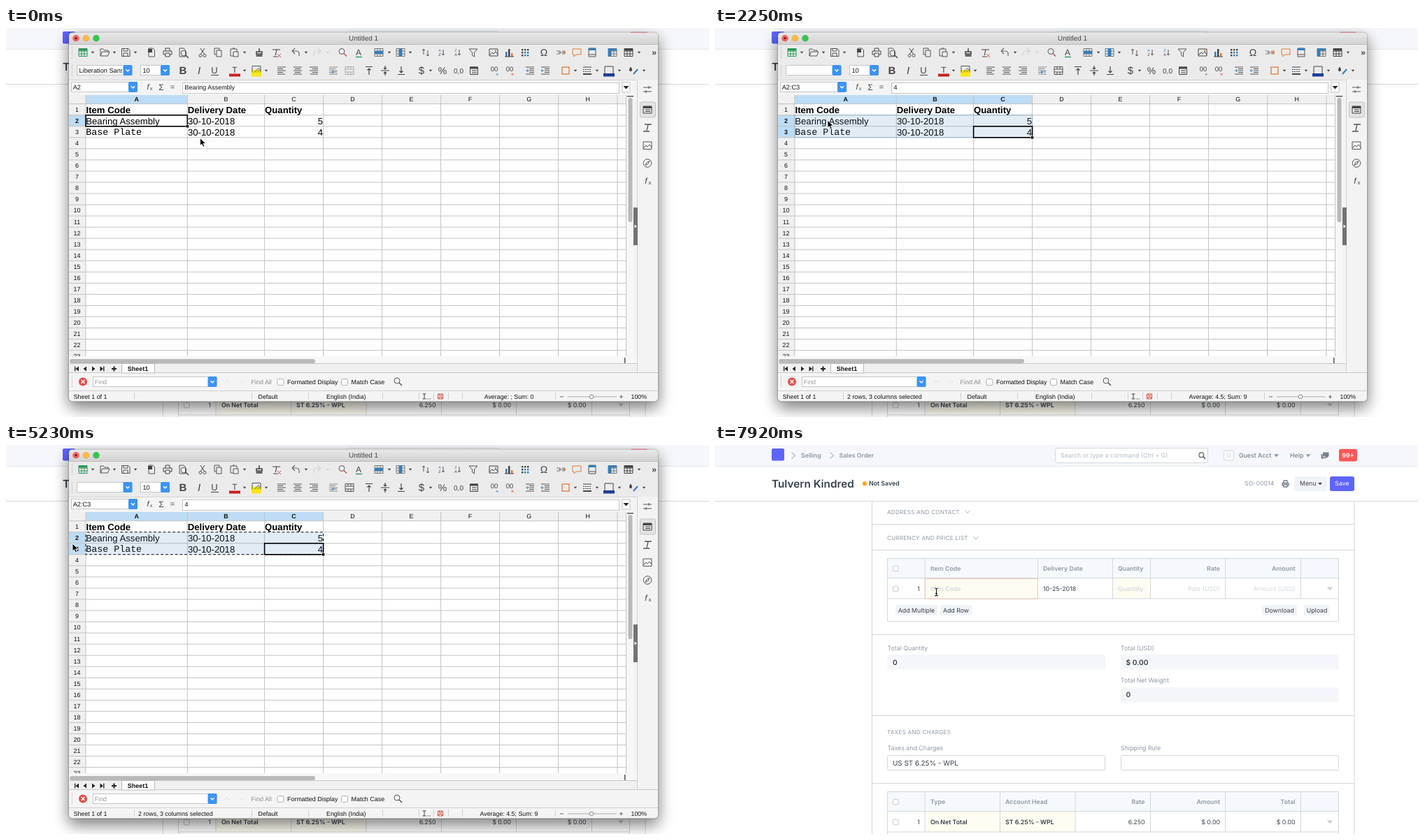
Animation, 1005 px wide and 557 px high, one loop 8 s. Source, as an HTML page:

```html
<!DOCTYPE html>
<html lang="en">
<head>
<meta charset="utf-8">
<title>Copy rows into an order</title>
<style>
html, body { margin: 0; width: 100%; height: 100%; overflow: hidden; background: #fff; }
svg { display: block; width: 1005px; height: 557px; text-rendering: geometricPrecision; }
text { white-space: pre; }
.shadow { filter: drop-shadow(0 9px 11px rgba(0, 0, 0, .38)) drop-shadow(0 0 1px rgba(0, 0, 0, .5)); }
</style>
</head>
<body>
<svg id="stage" viewBox="0 0 1005 557" xmlns="http://www.w3.org/2000/svg"></svg>
<script>
const LOOP = 8000;
const MID = { 'text-anchor': 'middle' }, END = { 'text-anchor': 'end' };
const SEMI = { 'font-weight': 600 }, BOLD = { 'font-weight': 700 };

const el = (tag, attrs, body = '') =>
  `<${tag} ${Object.entries(attrs).map(([k, v]) => `${k}="${v}"`).join(' ')}>${body}</${tag}>`;
const group = (attrs, parts) => el('g', attrs, parts.flat(9).join(''));
const rect = (x, y, width, height, fill, o = {}) => el('rect', { x, y, width, height, fill, ...o });
const dot = (cx, cy, r, fill, o = {}) => el('circle', { cx, cy, r, fill, ...o });
const line = (d, stroke, o = {}) => el('path', { d, stroke, fill: 'none', ...o });
const text = (x, y, s, o = {}) => el('text', { x, y, ...o }, s);
const icon = (x, y, d, stroke = '#555', o = {}) => line(d, stroke, { transform: `translate(${x} ${y})`, ...o });
const caret = (x, y, w, fill) => el('path', { d: `M${x - w} ${y - w / 2}h${2 * w}l${-w} ${w * 1.1}z`, fill });

/* ---------- order form ---------- */
const GREY = '#8d99a6', EDGE = '#d1d8dd', INK = '#36414c', PALE = { fill: '#d1d8dd' };
const box = (x, y, w, h, fill = '#fff', stroke = EDGE, rx = 0) => rect(x, y, w, h, fill, { stroke, rx });
const label = (x, y, s) => text(x, y, s, { fill: GREY });
const section = (y, s, chevron) => [
  text(246, y, s, { fill: GREY, 'font-size': 8.1, 'letter-spacing': .27 }),
  chevron ? icon(chevron, y - 2.7, 'M-3.5-2L0 2L3.5-2', '#aab4be') : ''];
const button = (x, y, w, s) => [rect(x, y, w, 15, '#f0f4f7', { rx: 2 }), text(x + w / 2, y + 10.7, s, MID)];
const total = (x, w, y, name, value) => [
  label(x, y, name), rect(x, y + 6.6, w, 21.4, '#f4f6f9', { rx: 2 }),
  text(x + 7.5, y + 21, value, { ...SEMI, 'font-size': 10.2 })];

function table(y, cuts, tinted, heads, footer) {
  const top = y + .5, mid = y + 29, low = y + 58.5, end = low + footer;
  return [
    rect(246, y, 646, 29, '#f6f9fc'),
    tinted.map(([a, b]) => rect(a, mid, b - a, 29, '#fffcf1')),
    line(`M246.5 ${top}H891.5V${end}H246.5ZM246.5 ${mid - .5}H891.5M246.5 ${low - .5}H891.5`, EDGE),
    line(cuts.map(x => `M${x} ${top}V${low}`).join(''), EDGE),
    [15.2, 44.3].map(d => box(254.5, y + d - 4, 7.5, 7.5, '#fff', '#c3c9cf', 1)),
    heads.map(([x, s, o]) => text(x, y + 17.6, s, { fill: GREY, ...SEMI, ...o })),
    text(291, y + 46.6, '1', MID), caret(879, y + 43.5, 4.2, '#c5ccd3')];
}

const page = group({ 'font-family': 'Inter, sans-serif', 'font-size': 8.8, fill: INK }, [
  rect(0, 0, 1005, 557, '#fff'),
  rect(0, 0, 1005, 30, '#f5f7fa'), line('M0 30.5H1005', '#e4e9ed'),
  rect(81, 5, 18, 17.5, '#5e64ff', { rx: 2 }),
  [112, 167].map(x => icon(x, 15, 'M-2.5-4.5L2.5 0L-2.5 4.5', '#b4bec8', { 'stroke-width': 1.2 })),
  text(123, 18.2, 'Selling', { fill: GREY, ...SEMI }),
  text(177.5, 18.2, 'Sales Order', { fill: GREY, ...SEMI }),
  box(486.5, 4.5, 218, 21, '#fff', EDGE, 3),
  text(494, 18.2, 'Search or type a command (Ctrl + G)', { fill: '#b3bcc5' }),
  icon(696, 15, 'M2.4 1.6L5 5', '#55606b', { 'stroke-width': 1.6 }),
  dot(695.3, 14.2, 3.4, 'none', { stroke: '#55606b', 'stroke-width': 1.2 }),
  box(727.5, 8, 14, 14, '#f9fafb', EDGE, 2), text(734.5, 18.2, 'G', { ...PALE, ...MID }),
  text(749, 17.8, 'Guest Acct', { fill: '#76828e', 'font-weight': 500 }), caret(802.5, 15, 3.6, GREY),
  text(822, 17.8, 'Help', { fill: '#76828e', 'font-weight': 500 }), caret(848, 15, 3.6, GREY),
  el('path', { d: 'M869 10.5h8.5v6h-1.5v1.5h-1.5l-2-1.5h-3.5z', fill: '#76828e' }),
  el('path', { d: 'M866.5 13h2v4.5h5.5v1.5h-4.5l-2 2v-2h-1z', fill: '#76828e' }),
  rect(892, 5.7, 26, 17.8, '#ff5858', { rx: 3 }), text(905, 18, '99+', { ...MID, ...SEMI, fill: '#fff' }),
  line('M0 80.5H1005', EDGE),
  text(81, 61, 'Tulvern Kindred', { ...SEMI, 'font-size': 15.3 }),
  dot(214, 55.3, 3, '#ffa00a'), text(220, 58.4, 'Not Saved', SEMI),
  text(757, 58.4, 'SO-00014', { fill: GREY }),
  icon(815.5, 55.5, 'M-2.5-1.5V-4.5H2.5V-1.5M-4.5 2.5V-1H4.5V2.5H2.5M-4.5 2.5H-2.5M-2.5 1H2.5V4.5H-2.5Z', '#76828e', { 'stroke-width': 1.3 }),
  rect(828, 45, 47, 21, '#f0f4f7', { rx: 3 }), text(836, 58.4, 'Menu'), caret(865, 55.5, 3, INK),
  rect(879, 45, 35, 21, '#5e64ff', { rx: 3 }), text(896.5, 58.4, 'Save', { ...MID, fill: '#fff' }),
  line('M224.5 81V557M914 81V557' + [113.5, 150.5, 271.5, 387.5, 484.5].map(y => `M224.5 ${y}H914`).join(''), EDGE),
  section(98.5, 'ADDRESS AND CONTACT', 361), section(135.8, 'CURRENCY AND PRICE LIST', 373),
  table(162, [300, 461.5, 568.5, 622.5, 729.5, 837.5], [[300, 461], [569, 622]], [
    [308, 'Item Code'], [469, 'Delivery Date'], [576, 'Quantity'], [722, 'Rate', END], [829.5, 'Amount', END]], 32),
  text(308, 208.7, 'Item Code', { ...PALE, ...SEMI }), text(469, 208.7, '10-25-2018'),
  text(576, 208.7, 'Quantity', { ...PALE, ...SEMI }),
  text(722, 208.7, 'Rate (USD)', { ...PALE, ...END }), text(829.5, 208.7, 'Amount (USD)', { ...PALE, ...END }),
  button(258, 229, 60, 'Add Multiple'), button(322, 229, 45, 'Add Row'),
  button(782, 229, 50, 'Download'), button(842, 229, 37, 'Upload'),
  total(246.5, 311.5, 293.5, 'Total Quantity', '0'), total(580, 311.5, 293.5, 'Total (USD)', '$ 0.00'),
  total(580, 311.5, 340.3, 'Total Net Weight', '0'),
  section(414, 'TAXES AND CHARGES'),
  label(246.5, 437.3, 'Taxes and Charges'), label(580, 437.3, 'Shipping Rule'),
  box(246.5, 444.5, 311, 21, '#fff', EDGE, 2), box(580.5, 444.5, 311, 21, '#fff', EDGE, 2),
  text(254, 459, 'US ST 6.25% - WPL', { 'font-size': 9.9 }),
  table(496, [300, 407.5, 515, 622.5, 729.5, 837.5], [[300, 515]], [
    [308, 'Type'], [415, 'Account Head'], [614.5, 'Rate', END], [722, 'Amount', END], [829.5, 'Total', END]], 8),
  text(308, 542.6, 'On Net Total', SEMI), text(415, 542.6, 'ST 6.25% - WPL', SEMI),
  text(614.5, 542.6, '6.250', END), text(722, 542.6, '$ 0.00', END), text(829.5, 542.6, '$ 0.00', END),
  rect(300.5, 191.5, 161, 29, 'none', { id: 'focus', stroke: '#f3c9bd' }),
  line('M308.5 200V211', '#222', { id: 'textCaret' }),
]);

/* ---------- spreadsheet ---------- */
const edges = [114, 259.3, 369.6, 453.6, 537.6, 621.6, 705.6, 789.7, 874];
const rowTop = n => 108.7 + (n - 1) * 16.04;
const HEAD = '#f0f0f0', PICKED = '#bddcf5';
const DARK = '#444', RED = '#d9483b', BLUE = '#2f7fc1', GREEN = '#2c9a5b', ORANGE = '#e07b39', NAVY = '#1c3f94';

const combo = (x, y, w, h = 15) => [
  rect(x + .5, y + .5, w - 1, h - 1, '#fff', { stroke: '#c6c6c6' }),
  rect(x + w - 13, y, 13, h, '#3d93f3', { rx: 2 }),
  icon(x + w - 6.5, y + h / 2, 'M-2.5-1.2L0 1.5L2.5-1.2', '#fff', { 'stroke-width': 1.3 })];
const grip = (y, h) => line(`M94.5 ${y}v${h}`, '#aaa', { 'stroke-dasharray': '1 1.5' });
const glyph = (x, y, s, size, o = {}) => text(x, y, s, { ...MID, 'font-size': size, fill: DARK, ...o });
const bars = (x, y, widths, align, stroke = '#555') => icon(x, y, widths.map((w, i) =>
  `M${align < 0 ? -6 : align > 0 ? 6 - w : -w / 2} ${i * 2.5 - 5}h${w}`).join(''), stroke);
const sheetIcon = (x, y, c) => icon(x, y, 'M-6-5.5H6V5.5H-6ZM-6-2H6M-6 2H6M-2-5.5V5.5M2-5.5V5.5', c);
const lens = (x, y, c) => [dot(x - 1, y - 1, 4, 'none', { stroke: '#555' }), icon(x, y, 'M2 2L6 6', c, { 'stroke-width': 1.5 })];
const PAGE = 'M-4-6H2L4.5-3.5V6H-4Z';

const mainBar = [
  grip(27, 16), sheetIcon(110, 35, GREEN), rect(104, 29.5, 12, 3, GREEN),
  icon(141, 35, 'M-6 5V-5H-2L0-3H5V-1M-6 5L-3.5-1H7L4.5 5Z'),
  icon(171, 35, 'M-5.5-5.5H4L6-3.5V5.5H-5.5ZM-3-5.5V-2H3V-5.5M-3 5.5V1H3V5.5'),
  icon(208, 35, PAGE), rect(203, 30, 6, 5, DARK),
  icon(231, 35, 'M-3-2V-6H3V-2M-3 3H-6V-2H6V3H3M-3 1H3V6H-3Z', DARK),
  icon(252, 35, PAGE), lens(255, 37, DARK),
  icon(281, 35, 'M-3-6L3 3M3-6L-3 3', DARK),
  [278, 284].map(x => dot(x, 39.5, 2, 'none', { stroke: '#555' })),
  icon(303, 35, 'M-5-6H2V-3M-5-6V3H-2M-2-3H5V6H-2Z'),
  icon(326, 35, 'M-5-5H4V-1M-5-5V5H-1M-1-1H6V6H-1ZM-2-6H1'),
  icon(362, 35, 'M0-6V-1M-4-1H4V2H-4Z', DARK, { 'stroke-width': 1.5 }), rect(357.5, 37, 9, 4, '#666'),
  glyph(386, 39, 'I', 12, { 'font-style': 'italic' }), icon(387, 36, 'M-6-5H5M-5 5H1', DARK), icon(387, 36, 'M1 1L6 6M6 1L1 6', RED),
  icon(414, 35, 'M-5-2H1Q6-2 5 5M-5-2L-1-6M-5-2L-1 2', '#666', { 'stroke-width': 1.2 }),
  icon(445, 35, 'M5-2H-1Q-6-2-5 5M5-2L1-6M5-2L1 2', '#d2d2d2', { 'stroke-width': 1.2 }),
  lens(481, 34.5, RED), glyph(504, 39, 'A', 12), line('M500 41.5H509', GREEN, { 'stroke-width': 1.4 }),
  sheetIcon(533, 35, '#777'), rect(527, 33, 12, 4, BLUE),
  sheetIcon(564, 35, '#777'), rect(562, 29.5, 4, 11, BLUE),
  icon(600, 35, 'M-3 3V-5M-5-3L-3-5L-1-3M3-3V5M1 3L3 5L5 3'),
  [[622, 'A', 'Z'], [645, 'Z', 'A']].map(([x, a, z]) => [
    glyph(x - 2, 34, a, 5.5, { fill: BLUE }), glyph(x - 2, 40, z, 5.5), icon(x + 3, 35, 'M0-4V4M-2 2L0 4L2 2')]),
  icon(668, 35, 'M-6-5H6L1.5 0V6L-1.5 4V0Z'),
  icon(697, 35, 'M-6-5H6V5H-6ZM-6 4L-2 0L0 2L3-1L6 3', DARK), rect(699, 31.5, 2, 2, ORANGE),
  rect(714, 34, 2.5, 7, BLUE), rect(718, 30, 2.5, 11, DARK), rect(722, 36, 2.5, 5, ORANGE), line('M713 41H726', DARK),
  [-4, 0, 4].map(a => [-4, 0, 4].map(b => rect(741 + a, 34 + b, 2.4, 2.4, b < 0 || a < 0 ? DARK : BLUE))),
  glyph(769, 40, 'Ω', 14), icon(793, 35, 'M-6-2H-1V2H-6M6-2H2M6 2H2M-3 0H4', '#777'), rect(797, 33.5, 3, 3, ORANGE),
  icon(816, 35, 'M-6-5H6V3H-1L-4 6V3H-6Z', ORANGE),
  icon(838, 35, 'M-5-6H5V6H-5ZM-5 3H5'), rect(833, 29, 10, 3, BLUE),
  sheetIcon(867, 35, '#777'), rect(861, 29.5, 4, 11, BLUE), rect(861, 29.5, 12, 3, BLUE),
  sheetIcon(890, 35, DARK), rect(884, 29.5, 12, 3, DARK),
  [124, 155, 185, 341, 429, 548, 578, 905].map(x => caret(x, 35, 2.3, DARK)), caret(460, 35, 2.3, '#d2d2d2'),
  glyph(926.5, 38.5, '»', 12, BOLD),
];

const vAlign = (x, d) => icon(x, 61, d, DARK, { 'stroke-width': 1.2 });
const formatBar = [
  grip(53, 16), combo(101, 53, 79.5), combo(192, 53, 42),
  el('clipPath', { id: 'fontClip' }, rect(102, 53, 64, 15, '#000')),
  text(104.5, 63.8, 'Liberation Sans', { id: 'fontName', 'clip-path': 'url(#fontClip)', 'font-size': 9.2 }),
  text(195.5, 63.8, '10', { 'font-size': 9.2 }),
  glyph(253, 66, 'B', 15, BOLD), glyph(276, 66, 'I', 15, { 'font-style': 'italic' }),
  glyph(298, 65, 'U', 13), line('M293 67.5H304', DARK),
  glyph(327, 64, 'T', 12), rect(319, 65.5, 16, 4, '#c9211e'),
  rect(351, 60, 14, 9.5, '#f9e814'), icon(358, 59.5, 'M-6 4V-5H6V4M-3 4L3-2L5 0L1 4'),
  bars(394, 61, [12, 8, 12, 8, 11], -1), bars(417, 61, [12, 8, 12, 8, 12], 0), bars(440, 61, [12, 8, 12, 8, 11], 1),
  bars(468, 61, [12, 9, 12, 6, 12], -1, '#888'), icon(470, 62, 'M-4 1H3M-2-1L-4 1L-2 3', BLUE),
  icon(491, 61, 'M-6-5.5H6V5.5H-6ZM-6-2H6M-6 2H6M-2-5.5V-2M2-5.5V-2M-2 2V5.5M2 2V5.5', '#555', { id: 'merge' }),
  vAlign(519, 'M-5-5.5H5M0 6V-3M-2.5-.5L0-3L2.5-.5'),
  vAlign(542, 'M-6 0H6M0-7V-2M-2-4L0-2L2-4M0 7V2M-2 4L0 2L2 4'),
  vAlign(565, 'M-5 5.5H5M0-6V3M-2.5 .5L0 3L2.5 .5'),
  glyph(594, 66, '$', 15), glyph(624, 65.5, '%', 14), glyph(647, 64.5, '0,0', 10),
  icon(669, 61, 'M-5.5-5H5.5V5.5H-5.5ZM-3 0H4M-3 3H4', DARK), rect(663.5, 55.5, 11, 3, DARK),
  [[698, BLUE, '+'], [720, RED, '×']].map(([x, c, s]) => [glyph(x, 62, '00', 9.5), glyph(x + 4, 69, s, 8, { fill: c })]),
  bars(749, 61, [12, 7, 7, 7, 12], 1), icon(745, 61, 'M-2 0H2M0-2L2 0L0 2', BLUE),
  bars(771, 61, [12, 7, 7, 7, 12], 1), icon(767, 61, 'M-2 0H2M0-2L-2 0L0 2', BLUE),
  rect(795, 56, 10, 10, 'none', { stroke: ORANGE, 'stroke-width': 1.3 }),
  icon(831, 61, 'M-6-5H6', DARK), icon(831, 61, 'M-6-1.5H6M-6 1.5H6', DARK, { 'stroke-dasharray': '2 1' }),
  icon(831, 61, 'M-6 5H6', DARK, { 'stroke-width': 2 }),
  icon(862, 60, 'M-6 5V-5H6V5', DARK), rect(854, 65, 16, 4.5, NAVY),
  icon(896, 60, 'M-3-4Q-6 1-3 2Q0 1-3-4Z', DARK, { fill: DARK }), icon(900, 63, 'M-3 3L3-4', BLUE, { 'stroke-width': 2 }),
  [341, 372, 607, 814, 845, 877, 912].map(x => caret(x, 61, 2.3, DARK)),
];

const formulaBar = [
  combo(93, 77, 95), text(95.7, 88, '', { id: 'cellName', 'font-size': 9.2 }),
  glyph(203, 88, 'f', 11, { 'font-style': 'italic' }), glyph(207.5, 89, 'x', 7),
  glyph(222, 88.5, 'Σ', 12), glyph(238, 88, '=', 11),
  rect(252.5, 78.5, 624, 15, '#fff', { stroke: '#c6c6c6' }), text(255.5, 88, '', { id: 'formula' }),
  rect(881, 78, 11, 14, '#fff', { stroke: '#c6c6c6' }), caret(886.5, 85, 4, '#222'),
];

const sideBar = [
  rect(902, 74, 30, 419, '#f3f3f3'), line('M902.5 74V493', '#cfcfcf'),
  icon(917, 88, 'M-6-3H6M-6 3H6M2-5V-1M-2 1V5'),
  rect(906.5, 106, 22, 22, '#e3e3e3', { stroke: '#c4c4c4', rx: 2 }),
  icon(917, 117, 'M-6-5H6V5H-6ZM-3 0H4M-3 2.5H4', DARK), rect(911, 112, 12, 3, DARK),
  icon(917, 143, 'M-4-5H6M1-5L-1 4M-6 5H3', '#555', { 'stroke-width': 1.3 }),
  icon(917, 168, 'M-6-5H6V5.5H-6ZM-6 4L-2 0L0 2L3-1L6 3'),
  dot(917, 193.5, 5.8, 'none', { stroke: '#555' }), icon(917, 193.5, 'M3-3L1 1L-3 3L-1-1Z'),
  glyph(915, 223, 'f', 12, { 'font-style': 'italic' }), glyph(920.5, 224, 'x', 8),
  rect(897, 257, 6, 54, '#737373'), el('path', { d: 'M898.5 281.5l3.5 2.5l-3.5 2.5z', fill: '#fff' }),
];

const CELL = { 'font-size': 13.15, fill: '#000' };
const range = (n, f) => Array.from({ length: n }, (_, i) => f(i));
const ants = (stroke, o) => rect(114, rowTop(2), 339.6, 32.08, 'none', { stroke, ...o });
const grid = [
  rect(90, 96, 797, 374, '#fff'), rect(90, 96, 797, 12.7, HEAD), rect(90, 96, 24, 374, HEAD),
  range(8, i => rect(edges[i], 96, edges[i + 1] - edges[i], 12.7, HEAD, { class: 'colHead' })),
  el('clipPath', { id: 'gridClip' }, rect(90, 96, 797, 374, '#000')),
  group({ 'clip-path': 'url(#gridClip)' }, [
    range(23, i => rect(90, rowTop(i + 1), 24, 16.04, HEAD, { class: 'rowHead' })),
    line([...edges, 886.5].map(x => `M${x} 96V470`).join('') +
      range(23, i => `M90 ${rowTop(i + 1)}H887`).join(''), '#c3c3c3'),
    range(8, i => text((edges[i] + edges[i + 1]) / 2, 105.4, 'ABCDEFGH'[i], { ...MID, class: 'colText' })),
    range(23, i => text(101.5, rowTop(i + 1) + 11.4, i + 1, { ...MID, class: 'rowText' })),
  ]),
  ['Item Code', 'Delivery Date', 'Quantity'].map((s, i) => text(edges[i] + .5, 121.5, s, { ...CELL, ...BOLD })),
  text(114.3, 137.5, 'Bearing Assembly', CELL),
  text(114.3, 153.2, 'Base Plate', { ...CELL, 'font-size': 13.3, 'font-family': "'Liberation Mono', monospace" }),
  [[137.5, 5], [153.5, 4]].map(([y, n]) => [text(260, y, '30-10-2018', CELL), text(453, y, n, { ...CELL, ...END })]),
  rect(0, 0, 0, 0, '#3c82be', { id: 'tint', 'fill-opacity': .15, stroke: '#3c82be', 'stroke-opacity': .4, 'stroke-width': .8 }),
  group({ id: 'ants' }, [
    ants('#fff', { 'stroke-width': 1.2 }),
    ants('#111', { id: 'dashes', 'stroke-width': 1.1, 'stroke-dasharray': '4 2.8' })]),
  rect(0, 0, 0, 0, 'none', { id: 'active', stroke: '#000', 'stroke-width': 1.6 }),
  rect(0, 0, 4.2, 4.2, '#000', { id: 'handle', stroke: '#fff', 'stroke-width': .6 }),
  rect(887, 96, 10, 374, '#f7f7f7'), rect(889.5, 100, 6, 178, '#b9b9b9', { rx: 3 }), rect(888, 97, 9, 1.5, '#555'),
  rect(90, 470, 812, 10, '#f7f7f7'), rect(91, 474, 351, 6, '#b9b9b9', { rx: 3 }), rect(884, 472, 1.5, 9, '#555'),
];

const check = x => rect(x, 502.5, 9, 9, '#fff', { stroke: '#b0b0b0', rx: 2 });
const footer = [
  rect(90, 480.5, 812, 13, '#f0f0f0'), line('M90 493.5H932M90 480.5H165M213 480.5H902', '#c9c9c9'),
  el('path', { d: 'M98 484.5h1.3v7h-1.3zM104 484.5v7l-4.5-3.5zM115 484.5v7l-4.5-3.5zM123 484.5v7l4.5-3.5zM134.5 484.5v7l4.5-3.5zM139.2 484.5h1.3v7h-1.3z', fill: '#222' }),
  icon(154.5, 488, 'M-3.5 0H3.5M0-3.5V3.5', '#222', { 'stroke-width': 2 }),
  rect(165.5, 480.5, 47, 13.5, '#fff', { stroke: '#bbb' }), text(188.5, 491, 'Sheet1', { ...MID, ...BOLD }),
  grip(498, 17), dot(110, 506.5, 6, '#e2504d'), icon(110, 506.5, 'M-2.5-2.5L2.5 2.5M2.5-2.5L-2.5 2.5', '#fff', { 'stroke-width': 1.3 }),
  combo(124, 499, 177.5), text(126.7, 509.8, 'Find', { fill: '#999' }),
  icon(316, 506.5, 'M-4 2L0-2L4 2', '#dedede'), icon(337, 506.5, 'M-4-2L0 2L4-2', '#dedede'),
  text(350.5, 509.8, 'Find All', { fill: '#8f8f8f' }),
  check(388), text(402, 509.8, 'Formatted Display'), check(479.5), text(493.5, 509.8, 'Match Case'),
  lens(560, 506, '#555'),
  line('M90 519.5H932' + [183.5, 351.5, 432.5, 538.5, 590.5, 611.5, 632.5, 652.5, 785.5].map(x => `M${x} 522v10`).join(''), '#cfcfcf'),
  group({ 'font-size': 8.85 }, [
    text(96.7, 530.8, 'Sheet 1 of 1'), text(189, 530.8, '2 rows, 3 columns selected', { id: 'picked' }),
    text(360.5, 530.8, 'Default'), text(486.3, 530.8, 'English (India)', MID),
    text(719, 530.8, '', { id: 'sums', ...MID }), text(893.5, 530.8, '100%')]),
  icon(598, 527.5, 'M-2.5-3.5H2.5M0-3.5V3.5M-2.5 3.5H2.5', DARK), line('M602 531H607', DARK, { 'stroke-dasharray': '1 1' }),
  icon(621, 527.5, 'M-3.5-3.5H3.5V3.5H-3.5ZM-1.5-3.5V-1H1.5V-3.5M-2 3.5V1H2V3.5', RED),
  line('M792 528H797M877 528H882M879.5 525.5V530.5', '#666'), line('M803 528H873', '#aaa'),
  dot(837, 528, 2.8, '#fff', { stroke: '#888' }),
];

const sheet = group({ id: 'sheet', 'font-family': "'Liberation Sans', Arial, sans-serif", 'font-size': 8.95, fill: '#111' }, [
  rect(90, 6.8, 842, 527.7, '#f4f4f4', { rx: 5, class: 'shadow' }),
  el('path', { d: 'M90 23V11.8q0-5 5-5H927q5 0 5 5V23z', fill: 'url(#bar)' }),
  rect(90, 23, 842, 51, '#ebebeb'), line('M90 23.5H932', '#bdbdbd'), line('M90 74.5H932', '#d4d4d4'),
  [['#fc605c', 100], ['#fdbc40', 114.5], ['#34c84a', 129]].map(([c, x]) => dot(x, 14.7, 4.6, c, { stroke: '#0002', 'stroke-width': .6 })),
  dot(100, 14.7, 1.6, '#7c1512'), text(511, 18.2, 'Untitled 1', { ...MID, 'font-size': 9.95, fill: '#444' }),
  mainBar, formatBar, formulaBar, grid, sideBar, footer,
]);

const gradient = '<defs><linearGradient id="bar" x2="0" y2="1"><stop stop-color="#e8e8e8"/><stop offset="1" stop-color="#d2d2d2"/></linearGradient></defs>';
const BEAM = 'M-2.5-5.5Q0-5.5 0-4V4Q0 5.5-2.5 5.5M2.5-5.5Q0-5.5 0-4M0 4Q0 5.5 2.5 5.5M-1.5 2H1.5';
const stage = document.getElementById('stage');
stage.innerHTML = gradient + page + sheet +
  el('path', { id: 'arrow', d: 'M0 0V11L2.5 8.7L4.2 12.7L6.3 11.8L4.6 8H8Z', fill: '#000', stroke: '#fff', 'stroke-width': .9 }) +
  group({ id: 'beam' }, [line(BEAM, '#fff', { 'stroke-width': 2.4 }), line(BEAM, '#111', { 'stroke-width': 1.1 })]);

/* ---------- motion ---------- */
const $ = id => document.getElementById(id);
const all = c => [...stage.getElementsByClassName(c)];
const colHead = all('colHead'), colText = all('colText'), rowHead = all('rowHead'), rowText = all('rowText');

// time, x, y of the pointer
const path = [
  [0, 277.5, 157.5], [150, 284, 160], [300, 310, 161], [450, 350, 161], [600, 392, 158], [770, 420, 153],
  [920, 430, 148], [1070, 432, 146], [1520, 335, 144], [1660, 228.5, 140.5], [1810, 190, 137],
  [1960, 170, 134], [2100, 163, 133], [2250, 161, 132], [5230, 95, 141], [5380, 14, 149],
  [5670, 11, 153], [5820, 19, 155], [5970, 26, 156], [6560, 190, 185], [6730, 302, 203],
  [7030, 312, 207], [7180, 315, 209], [7320, 316.5, 210.5]];
// time, range name, first and last column, first and last row
const picks = [
  [0, 'A2', 0, 0, 2, 2], [1070, 'C3', 2, 2, 2, 2], [1220, 'C3', 2, 2, 3, 3],
  [1520, 'B3:C3', 1, 2, 3, 3], [1660, 'A3:C3', 0, 2, 3, 3], [1810, 'A2:C3', 0, 2, 2, 3]];
const antTimes = [3440, 3890, 4490, 4940, 5230, 5380, 5670, 5820, 5970];
const focusTimes = [7180, 7320, 7470];

const passed = (times, t) => times.filter(s => s <= t).length;
const current = (list, t) => list[passed(list.map(s => s[0]), t) - 1];
const set = (node, attrs) => { for (const k in attrs) node.setAttribute(k, attrs[k]); };
const show = (id, on) => set($(id), { visibility: on ? 'visible' : 'hidden' });
const put = (id, s) => { if ($(id).textContent !== s) $(id).textContent = s; };
const span = (c0, c1, r0, r1) => ({
  x: edges[c0], y: rowTop(r0), width: edges[c1 + 1] - edges[c0], height: rowTop(r1 + 1) - rowTop(r0) });
const mark = (heads, labels, first, last) => heads.forEach((h, i) => {
  const on = i >= first && i <= last;
  set(h, { fill: on ? PICKED : HEAD });
  set(labels[i], { 'font-weight': on ? 700 : 400 });
});

function draw(t) {
  const [, name, c0, c1, r0, r1] = current(picks, t);
  put('cellName', name);
  put('formula', t < 1070 ? 'Bearing Assembly' : '4');
  mark(colHead, colText, c0, c1);
  mark(rowHead, rowText, r0 - 1, r1 - 1);
  set($('tint'), span(c0, c1, r0, r1));
  const a = t < 1220 ? span(0, 0, 2, 2) : span(2, 2, 3, 3);
  set($('active'), a);
  set($('handle'), { x: a.x + a.width - 2.1, y: a.y + a.height - 2.1 });

  const summed = t >= 2100, inSheet = t < 6260;
  put('sums', summed ? 'Average: 4.5; Sum: 9' : 'Average: ; Sum: 0');
  set($('merge'), { opacity: summed ? 1 : .4 });
  set($('dashes'), { 'stroke-dashoffset': -1.7 * passed(antTimes, t) });
  set($('sheet'), { display: inSheet ? 'inline' : 'none' });
  show('tint', inSheet && t >= 1520);
  show('ants', inSheet && t >= 3440);
  show('picked', inSheet && summed);
  show('fontName', inSheet && !summed);

  const [, x, y] = current(path, t), transform = `translate(${x} ${y})`;
  set($('arrow'), { transform });
  set($('beam'), { transform });
  show('arrow', t < 7030);
  show('beam', t >= 7030);
  set($('focus'), { opacity: passed(focusTimes, t) / focusTimes.length });
  show('textCaret', t >= 7320 && t < 7920);
}

const start = performance.now();
function tick() {
  draw((performance.now() - start) % LOOP);
  requestAnimationFrame(tick);
}
tick();
</script>
</body>
</html>
```
